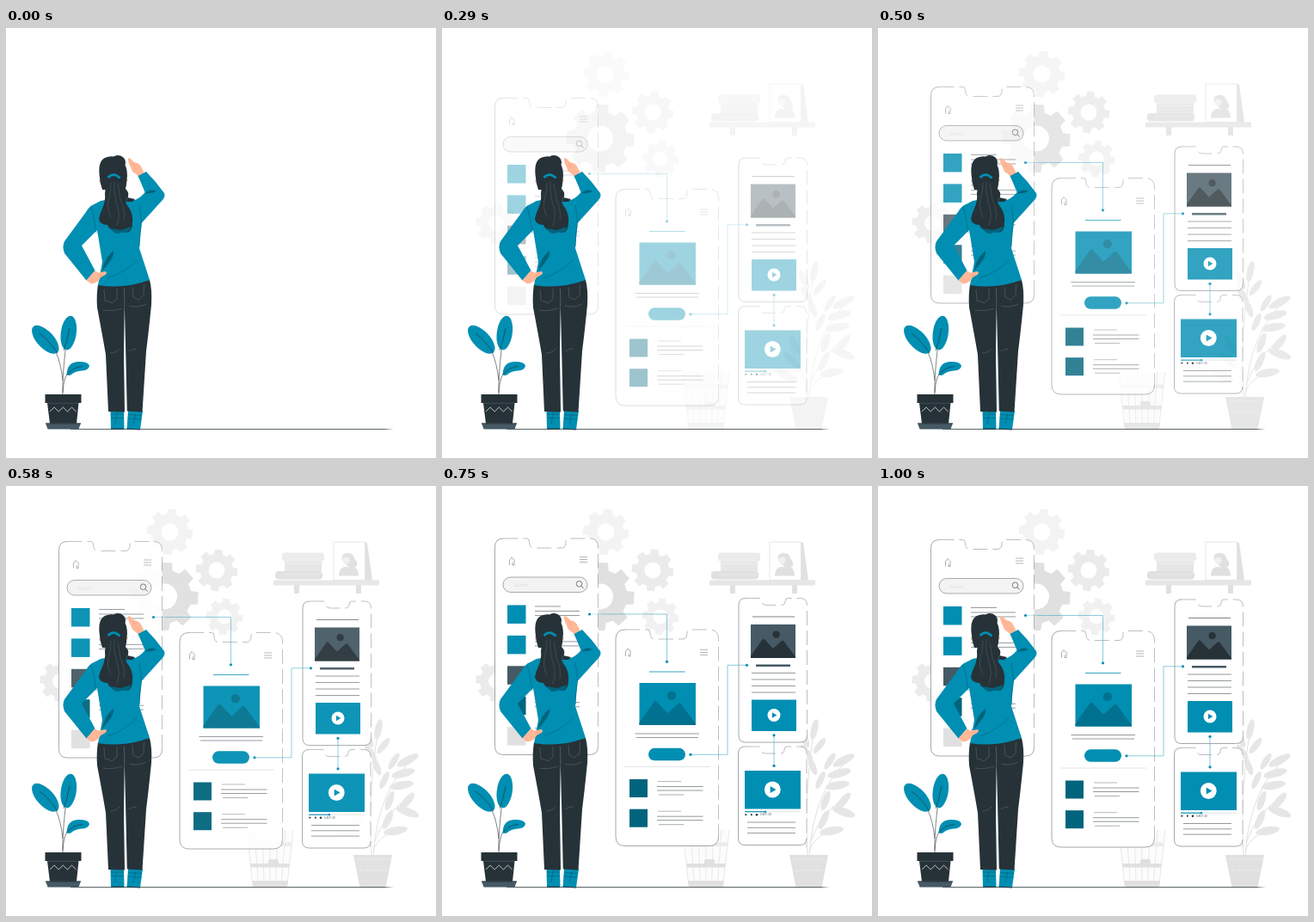
An HTML page that plays this animation: 500x500 px, repeating every 1040 ms.

```html
<!DOCTYPE html>
<html lang="en">
<head>
<meta charset="utf-8">
<title>App wireframe</title>
<style>
html, body { margin: 0; width: 100%; height: 100%; overflow: hidden; background: #fff; }
svg { display: block; width: 100vw; height: 100vh; }
text { font-family: Roboto, sans-serif; }
</style>
</head>
<body>
<svg id="stage" viewBox="0 0 500 500"></svg>
<script>
const TEAL = '#008eb2', DEEP = '#00647c', DARK = '#263238', SLATE = '#455a64',
  SKIN = '#ffb797', PALE = '#ebebeb', GREY = '#e0e0e0';

const path = (d, fill, extra = '') => `<path d="${d}" fill="${fill}" ${extra}/>`;
const stroke = (d, color, width = .6, dash = 'none') =>
  `<path d="${d}" fill="none" stroke="${color}" stroke-width="${width}" stroke-dasharray="${dash}" stroke-linejoin="round"/>`;
const rect = (x, y, w, h, fill, r = 0, extra = '') =>
  `<rect x="${x}" y="${y}" width="${w}" height="${h}" rx="${r}" fill="${fill}" ${extra}/>`;
const dot = (x, y, r, fill) => `<circle cx="${x}" cy="${y}" r="${r}" fill="${fill}"/>`;
const rule = (x1, x2, y, color = DARK, width = .5) => stroke(`M${x1} ${y}H${x2}`, color, width);
const ellipse = (x, y, rx, ry, turn, fill) =>
  `<ellipse cx="${x}" cy="${y}" rx="${rx}" ry="${ry}" fill="${fill}" transform="rotate(${turn} ${x} ${y})"/>`;

// ---------- background ----------
function gear(cx, cy, r, hole, fill, turn = 0) {
  const pts = [];
  for (let i = 0; i < 8; i++) {
    const mid = i * Math.PI / 4 + turn;
    for (const [da, k] of [[-.26, .79], [-.18, 1], [.18, 1], [.26, .79]])
      pts.push((cx + r * k * Math.cos(mid + da)).toFixed(1) + ' ' + (cy + r * k * Math.sin(mid + da)).toFixed(1));
  }
  const ring = `M${cx - hole} ${cy}a${hole} ${hole} 0 1 0 ${2 * hole} 0a${hole} ${hole} 0 1 0 ${-2 * hole} 0Z`;
  return path(`M${pts.join('L')}Z${ring}`, fill, 'fill-rule="evenodd"');
}

function shelf() {
  return rect(335, 115, 6, 10, GREY) + rect(407, 115, 6, 10, GREY) +
    rect(311, 109.5, 123, 6, '#e6e6e6') +
    rect(321, 77.5, 49, 10, PALE, 3) + rect(324, 87.5, 43, 11.5, '#e6e6e6') +
    rect(313, 99, 55, 9.5, GREY, 4) + rule(323, 366, 90.5, '#f5f5f5') + rule(322, 366, 103, '#f5f5f5') +
    path('M416 65L420 66L426 109.5H416Z', GREY) +
    rect(381, 65, 36.5, 44.5, '#fff', 0, `stroke="${GREY}" stroke-width=".8"`) +
    path('M387 104.5Q387 95 394 94L406 95Q410 97 410 104.5Z', GREY) +
    path('M391 86Q389 79 396 78Q404 77 405 84Q409 88 408 93Q404 97 399 95Z', GREY) +
    dot(395.5, 86.5, 4, '#f0f0f0');
}

function basket() {
  let ribs = '';
  for (let i = 0; i <= 6; i++) ribs += `M${280 + i * 9} 400L${287 + i * 6.6} 466`;
  return path('M280 400H334L327 466H287Z', '#fcfcfc') + stroke(ribs, GREY, .7) +
    path('M282 414.5H332.5L332 419H282.5Z', PALE) +
    path('M284 439H330L329.5 443.5H284.5Z', GREY) + rect(305, 434, 12, 9, GREY, 2) +
    path('M286 459H328L327 466H287.5Z', GREY);
}

const leaves = [ // x, y, turn, half length
  [433, 283, 12, 12], [421, 293, -25, 12], [439, 302, 38, 11], [424, 310, -35, 11], [451, 320, 32, 11],
  [467, 319, 62, 14], [431, 326, -22, 11], [462, 334, 75, 14], [440, 342, 25, 11], [460, 348, 80, 14],
  [466, 367, 40, 13], [446, 366, 20, 12], [467, 379, 110, 14], [444, 388, 25, 12], [453, 401, 80, 14],
  [410, 368, -30, 12], [402, 405, -65, 14], [406, 386, -45, 12]
];
function backPlant() {
  return stroke('M425 430Q420 360 433 280M427 430Q432 350 478 313M428 415Q440 380 470 361M427 425Q432 405 462 399M424 420Q418 395 405 372', GREY, 1) +
    leaves.map(([x, y, a, l]) => ellipse(x, y, l * .34, l, a, '#e6e6e6')).join('') +
    path('M404 429H449L441.5 466.5H411.5Z', GREY) +
    stroke('M407 434H446M409 447H444', '#f0f0f0') +
    stroke('M412 447V434M420 447V434M428 447V434M436 447V434', PALE, .5);
}

const background = () =>
  gear(190.5, 53.5, 27, 10, '#f3f3f3', .1) + gear(245, 98, 24.5, 9.5, PALE, .1) +
  gear(184, 128.5, 40, 15, GREY, .05) + gear(254, 152, 21.5, 8.5, '#f1f1f1', .1) +
  gear(63, 227, 24, 9, PALE, .1) + shelf() + basket() + backPlant();

// ---------- phones ----------
// The hairline outline is solid along the left and bottom and broken along the top and right.
function phone(x1, x2, y1, y2, r, n1, n2, depth) {
  const top = `H${n1 - 3}Q${n1} ${y1} ${n1} ${y1 + 4}Q${n1} ${y1 + depth} ${n1 + 5} ${y1 + depth}` +
    `H${n2 - 5}Q${n2} ${y1 + depth} ${n2} ${y1 + 4}Q${n2} ${y1} ${n2 + 3} ${y1}` +
    `H${x2 - r}Q${x2} ${y1} ${x2} ${y1 + r}V${y2 - r}`;
  const bottom = `Q${x2} ${y2} ${x2 - r} ${y2}H${x1 + r}Q${x1} ${y2} ${x1} ${y2 - r}V${y1 + r}Q${x1} ${y1} ${x1 + r} ${y1}`;
  return path(`M${x1 + r} ${y1}${top}${bottom}Z`, '#fff') +
    stroke(`M${x1 + r} ${y1}${top}`, DARK, .32, '17 6') +
    stroke(`M${x2} ${y2 - r}${bottom}`, DARK, .42);
}
const home = (x, y) => stroke(`M${x - 3} ${y}L${x} ${y - 4}L${x + 4} ${y}M${x - 2.5} ${y}V${y + 5}M${x + 3} ${y}V${y + 5}H${x + 1}V${y + 2}`, DARK, .4);
const menu = (x, y) => [0, 3, 6].map(k => rule(x, x + 9, y + k, DARK, .35)).join('');
const play = (x, y, r) => dot(x, y, r, '#fff') +
  path(`M${x - r * .28} ${y - r * .42}L${x + r * .45} ${y}L${x - r * .28} ${y + r * .42}Z`, TEAL);

function photo(x, y, w, h, sky, hill, sun) {
  const at = (u, v) => `${(x + w * u).toFixed(1)} ${(y + h * v).toFixed(1)}`;
  return rect(x, y, w, h, sky) + dot(x + w * .57, y + h * .3, h * .105, sun) +
    path(`M${at(0, 1)}L${at(0, .94)}L${at(.26, .45)}Q${at(.285, .41)} ${at(.31, .45)}L${at(.5, .72)}L${at(.68, .5)}Q${at(.71, .46)} ${at(.74, .5)}L${at(1, .97)}V${y + h}Z`, hill);
}

function searchPhone() {
  const tiles = [TEAL, TEAL, SLATE, DEEP, GREY].map((c, i) => {
    const y = 138.5 + i * 35.4;
    return rect(76, y, 21.5, 21.5, c) + rule(108, 138, y + 1.5) + rule(108, 160, y + 7) + rule(108, 160, y + 12);
  }).join('');
  return phone(61.5, 181.5, 61, 312.5, 10, 101.5, 144, 11) + home(81, 87) + menu(160, 82.5) +
    rect(71, 106, 98, 17.5, '#f3f3f3', 8.7, `stroke="${DARK}" stroke-width=".4"`) +
    `<text x="83" y="117" font-size="5.5" fill="#e0e0e0">Search</text>` +
    `<circle cx="159.5" cy="113.8" r="3.3" fill="none" stroke="${DARK}" stroke-width=".6"/>` +
    stroke('M162 116.3L164.5 119', DARK, .7) + tiles;
}

function articlePhone() {
  const row = y => rect(218, y, 21, 21, DEEP) + rule(251, 278, y + 2.5, DARK, .35) +
    rule(250, 303.5, y + 8.5) + rule(250, 303.5, y + 13) + rule(252, 281, y + 18, DARK, .4);
  return phone(202, 321.5, 167, 418.5, 11, 242, 285, 11) + home(216, 193) + menu(300, 190.5) +
    rule(241, 282.5, 216, TEAL, .8) + photo(229.5, 229, 65.5, 49, TEAL, '#00718f', '#00718f') +
    rule(224.5, 299, 288) + rule(226, 298, 292.5) + rect(240, 304.8, 43, 14.5, TEAL, 7.2) +
    rule(212, 312, 326.5, '#c4c8ca', .5) + row(341) + row(375.7);
}

function newsPhone() {
  return phone(345, 424.5, 130.5, 298, 8, 372, 399, 8) + rule(361, 410, 152, DARK, .6) +
    photo(359, 161, 52, 39, SLATE, DARK, DARK) + rule(365, 405, 208.8, SLATE, 2.4) +
    [217.5, 225, 232.5, 240].map(y => rule(360, 411, y)).join('') +
    rect(360, 248.5, 52, 36.5, TEAL) + play(386, 266.5, 7.5);
}

function videoPhone() {
  return phone(344.5, 424, 303, 417.5, 8, 371, 398, 8) + rect(352, 331, 65, 44.5, TEAL) +
    play(384.3, 353, 9.4) + rule(352, 417, 378.7, '#c4c8ca', .5) + rule(352, 376, 378.7, TEAL, 1.1) +
    dot(376, 378.7, 1.2, TEAL) +
    path('M352.5 380.8L355 382.2L352.5 383.6ZM359 380.8L361.5 382.2L359 383.6Z', DARK) + dot(366, 382.2, 1.3, DARK) +
    `<text x="370" y="383.4" font-size="3" fill="${SLATE}">0:45/1:30</text>` +
    rule(355, 411, 391) + rule(355, 411, 397.3) + rule(355, 411, 403.6);
}

function links() {
  const dots = [[171.5, 149], [261.5, 204.3], [289, 312.3], [354.5, 208.3], [386, 289.8], [386, 325.3]];
  return stroke('M185 149H261.5V204.3M289 312.3H332V208.3H354.5M386 289.8V325.3', '#3fa9c4', .6) +
    stroke('M171.5 149H185', '#3fa9c4', .3) +
    dots.map(([x, y]) => dot(x, y, 1.6, TEAL)).join('');
}

const phones = () => searchPhone() + articlePhone() + newsPhone() + videoPhone() + links();

// ---------- foreground ----------
function pottedPlant() {
  let zig = 'M51 446';
  for (let i = 1; i <= 6; i++) zig += `L${51 + i * 5.1} ${i % 2 ? 441 : 446}`;
  return stroke('M66 426Q65 400 73 345M66 410Q64 390 58 377M66 424Q67 402 76 397', DARK, .6) +
    ellipse(45.8, 362.3, 9.8, 20.5, -43, TEAL) + ellipse(72.8, 354.5, 9, 20, 8, TEAL) +
    path('M70.5 403Q71 388 85 388Q96 388 97 393Q96 398 88 398.5Q80 399 76 403Q73 405 70.5 403Z', TEAL) +
    stroke('M60 378Q50 363 39 355M67 375Q71 365 74 349M71 403Q78 394 89 393.5', DARK, .6) +
    path('M48 436H84.5L82 460H51Z', DARK) + rect(45.5, 426, 42, 10, DARK) +
    stroke(zig, '#fff', .7) + stroke('M49 436.3H84', SLATE, .7) +
    path('M46 459.5H87L84.5 466.5H48.5Z', SLATE) + rule(46, 87, 460, DARK, .8);
}

function legs() {
  return path('M121.5 445H137L137.5 466.5H122Z', TEAL) + path('M142 445H159L156 467H140.5Z', TEAL) +
    stroke('M122 449H137M122 453.5H137M142 449.5L158 450.5M141.5 454L157.5 455M127 461L129 447M148 461L151 448', DEEP, .7) +
    rule(122, 137, 466.3, DARK, 1.2) + stroke('M140.5 466L156 467', DARK, 1.2) +
    path('M107 298L167 293Q170 304 169 322Q166 352 163 376L158.5 446.5L140.8 445.5L139.3 380L137.8 322L137 380L138 446.5L119 446L116 380Q113 362 106 325Q105 310 107 298Z', DARK) +
    stroke('M137.3 303Q138 312 137.8 324', '#7d878c', .5) +
    stroke('M114 304L115 317Q121 318 123 320L129 315V303M147 301L148 313L154 316L160 311L160.5 298M113 328Q122 330 135 326M143 323Q153 326 163 321M121 378Q128 378 132 373M143 376Q147 373 152 373', '#6b777d', .45);
}

function jumper() {
  return path('M153.5 172L163 167Q174 178 184 192Q185.5 196 182 200L157.5 227L146 207L150 200Q157 197 161.5 191Q158 182 153.5 172Z', TEAL) +
    path('M101 206Q97 207 93 214L68 248Q65 254 68 262L93.5 293.5L103.5 282L88 253L108 233Z', TEAL) +
    path('M110 201Q130 196 150 200Q157 212 157.5 228L155 256L167 293Q137 304 107 299L112 272L106 235L98.5 207Z', TEAL) +
    path('M111.5 283Q115 266 125 259Q126 264 121 271Z', DEEP) +
    path('M162 192Q168 186 175 190Q169 193 162 192Z', DEEP) +
    path('M141 197L150 199L147 202L140 202Z', DARK) +
    stroke('M99 208Q103 220 105 238M157.5 228Q155 240 155 254M155 206Q157 216 157.5 228M118 291Q140 283 152 270', DEEP, .6);
}

const raisedHand = () =>
  path('M142 151.5Q144 150.5 146 153L149 156Q155 157 157 161L160.5 168L154 172.5L150 169Q146 167 145 162Q141.5 156 142 151.5Z', SKIN) +
  stroke('M147 157L150 162', '#e8967a', .5);

const hipHand = () =>
  path('M93.5 293.5L103.5 282L107 284.5L116 283Q118 285 115.5 287L110 290Q107 297 99 297.5Z', SKIN) +
  stroke('M108 288L114 286', '#e8967a', .5);

function hair() {
  return dot(140, 177, 1.8, SKIN) + dot(109.5, 178, 1.3, SKIN) +
    path('M108.5 170Q107 152 118 150Q122 149 125 149.5Q132 146 137 151Q140 155 138.5 159Q142 167 140.5 176Q140 186 138 189L112 188Q109 180 108.5 170Z', DARK) +
    path('M118 174Q125 168 133 175Q134 184 140 188Q144 193 141 198Q137 202 143 209Q148 217 147 226Q147 236 141 238Q138 234 135 237Q128 241 124 235Q120 234 118 229Q109 229 108 222Q109 216 112 210Q116 201 115 192Q116 183 118 174Z', DARK) +
    path('M122 233Q126 242 135 237Q139 240 144 235L145 231L134 235Z', DEEP) +
    stroke('M118.5 174Q125 167 132.5 174.5', TEAL, 2.8) +
    stroke('M122 180Q122 190 119 200Q117 210 122 220M126 178Q125 195 130 208Q133 218 129 230M130 181Q132 192 133 200Q139 212 137 224', '#5f6f76', .4);
}

const foreground = () => path('M75 466.1H440L451 466.4L440 466.7H75Z', DARK) +
  pottedPlant() + legs() + raisedHand() + jumper() + hipHand() + hair();

document.getElementById('stage').innerHTML =
  `<g id="back">${background()}</g><g id="phones">${phones()}</g><g>${foreground()}</g>`;

// ---------- motion: [step, value] ----------
const LOOP = 1040, LAST = 24;
const fade = [[1, 0], [2, .012], [5, .21], [9, .54], [12, .8], [14, .94], [16, 1]];
const lift = [[2, 33], [5, 25.5], [9, 15.5], [12, 7.5], [14, 3.5], [15, 1.7], [16, .5], [17, 0], [18, 0], [20, .3], [24, 1.5]];

function sample(keys, n) {
  if (n <= keys[0][0]) return keys[0][1];
  for (let i = 1; i < keys.length; i++) {
    const [a, u] = keys[i - 1], [b, v] = keys[i];
    if (n <= b) return u + (v - u) * (n - a) / (b - a);
  }
  return keys[keys.length - 1][1];
}

// 24 steps per second, each start rounded to 10 ms
function stepAt(t) {
  let n = LAST;
  while (n > 0 && Math.round(n * 100 / 24) * 10 > t) n--;
  return n;
}

const back = document.getElementById('back'), group = document.getElementById('phones');
const start = performance.now();
function draw() {
  const n = stepAt((performance.now() - start) % LOOP);
  const alpha = sample(fade, n);
  back.setAttribute('opacity', alpha);
  group.setAttribute('opacity', alpha);
  group.setAttribute('transform', `translate(0 ${sample(lift, n).toFixed(2)})`);
  requestAnimationFrame(draw);
}
draw();
</script>
</body>
</html>
```
